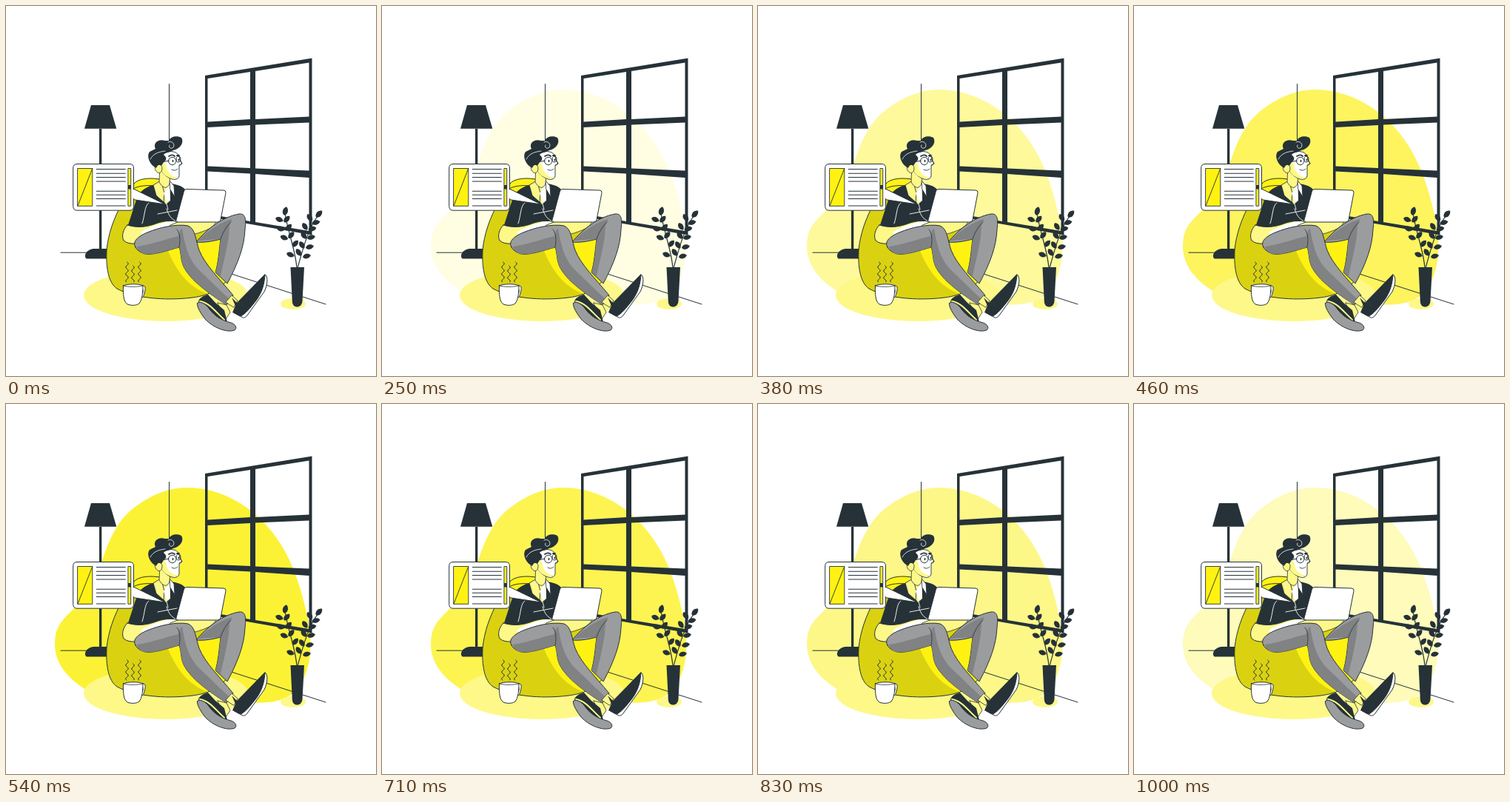
An HTML page with a canvas that plays this animation: 500 by 500 pixels, repeating every 1040 ms.

```html
<!DOCTYPE html>
<html lang="en">
<head>
<meta charset="utf-8">
<title>Reading at home</title>
<style>
html, body { margin: 0; width: 100%; height: 100%; overflow: hidden; background: #fff; }
canvas { display: block; width: 500px; height: 500px; }
</style>
</head>
<body>
<canvas id="stage" width="500" height="500"></canvas>
<script>
const ctx = document.getElementById('stage').getContext('2d');
const INK = '#263238', YELLOW = '#fff212', PALE = '#fef888', SHADE = '#dad211', GLOW = '#fcf017';
const GREY = '#9a9c9e', DARK = '#808284', WHITE = '#fff';
const LOOP = 1040;

function draw(d, fill, stroke, width = 1) {
  const path = new Path2D(d);
  if (fill) { ctx.fillStyle = fill; ctx.fill(path, 'evenodd'); }
  if (stroke) { ctx.strokeStyle = stroke; ctx.lineWidth = width; ctx.stroke(path); }
}
const line = (d, color = INK, width = 1) => draw(d, null, color, width);

function oval(x, y, rx, ry, fill) {
  ctx.beginPath();
  ctx.ellipse(x, y, rx, ry, 0, 0, Math.PI * 2);
  ctx.fillStyle = fill;
  ctx.fill();
}

// The glow advances at 24 steps per second, on a 10 ms clock.
const stepStart = k => 10 * Math.round(k * 100 / 24);
const glow = [[2, 0], [4, .03], [6, .12], [9, .43], [11, .69], [13, .87], [15, .94],
              [16, .85], [17, .75], [20, .51], [24, .29], [25, .25]];

function glowAt(t) {
  let k = 25;
  while (stepStart(k) > t) k--;
  if (k < 3) return 0;
  const i = glow.findIndex(g => g[0] >= k);
  const [k0, a0] = glow[i - 1], [k1, a1] = glow[i];
  return a0 + (a1 - a0) * (k - k0) / (k1 - k0);
}

function backdrop(alpha) {
  ctx.globalAlpha = alpha;
  draw('M242 113C285 112 326 134 353 165C387 203 399 250 408 290C414 323 414 365 390 389C374 404 345 406 320 402L130 396C112 390 95 379 84 367C70 352 64 335 66.5 316C69 288 99 276 115 251C128 224 133 192 150 166C164 141 204 114 242 113Z', GLOW);
  ctx.globalAlpha = 1;
  oval(216, 391, 111, 35, PALE);
  oval(388, 402.5, 17, 7.5, PALE);
  line('M220.5 105.5V184M74 333.2H110M306 362.5L432 403');
}

function windowFrame() {
  draw('M269 94L413.5 70.5V309.5L269 284Z' +
    'M272.5 98L330 89V153L272.5 156.5Z M337 88L409.5 76.5V149.5L337 153Z' +
    'M272.5 164L330 161V219L272.5 216.5Z M337 160.5L409.5 157.5V222.5L337 219.5Z' +
    'M272.5 223.5L330 226.5V291L272.5 281Z M337 227L409.5 232V304L337 292Z', INK);
}

function lamp() {
  draw('M115 134H140L149.3 165.7H106Z M126 166H129.3V329H126Z', INK);
  draw('M109 341.5C104 339 108 328 120 328H142V341.5Z', INK);
}

function leaf(x, y, angle, size = 5.6) {
  ctx.save();
  ctx.translate(x, y);
  ctx.rotate(angle * Math.PI / 180);
  ctx.scale(size, size);
  draw('M-1 0C-.7 -.7 .4 -.85 1 0C.4 .85 -.7 .7 -1 0Z', INK);
  ctx.restore();
}

function plant() {
  line('M393 354C391 329 381 306 377 280M394 354C401 329 408 302 421 284', INK, 1.2);
  leaf(377.5, 277, -75, 6);
  leaf(423, 281, -48, 6);
  [[369.5, 288.5], [371, 301], [376, 313], [384.5, 336]].forEach(([x, y]) => leaf(x, y, 22));
  [[379.5, 288], [382, 299], [385.5, 309.5], [391, 321]].forEach(([x, y]) => leaf(x, y, -48));
  [[410.5, 286], [404, 298], [402.5, 310], [400, 323], [395.5, 333]].forEach(([x, y]) => leaf(x, y, 55));
  [[419, 292.5], [414, 301], [412.5, 312.5], [410.5, 325.5], [406.5, 338]].forEach(([x, y]) => leaf(x, y, -12));
  draw('M384.5 353H403L400.5 399C400 404 397 406.5 393.5 406.5C389.5 406.5 387 404 386.8 399Z', INK);
}

function chair() {
  const body = 'M173 240C178 233 196 231 212 235L245 288L297 305L300 367C294 381 276 391 252 394C213 399 172 394 150 382C138 374 135 352 136 330C138 308 146 286 157 266Z';
  draw(body, SHADE);
  draw('M173 240C178 233 196 231 212 235L205 255L174 250Z', YELLOW);
  draw('M217 327C226 346 238 376 272 389C282 385 293 380 299 370L300 310L260 318Z', YELLOW);
  line(body);
  line('M174 246C180 243 190 242 199 243');
}

function torso() {
  draw('M198 242C187 246 180 251 177 259L165 296C171 302 190 303 215 299L233 291C238 276 242 262 242 248C238 243 230 241 223 240Z', INK);
  draw('M199 242L209 234L221 238L222 263L216 268Z', PALE);
  draw('M209 236L199 242L203 256L213 265L214 253Z', PALE, INK, .9);
  draw('M221 236L227 243L228 258L222 248Z', WHITE, INK, .9);
  draw('M213 253L221 240L222 262L217 266Z', WHITE);
  line('M193 266C187 270 188 282 184 294M205 281L231 276M217 267L219 275M217 274C220 284 224 288 230 291', WHITE, .9);
  // forearm and hands
  draw('M164 296C158 302 156 311 159 317C167 324 181 321 193 316L229 302L234 293C225 288 210 291 200 295C188 299 177 300 164 296Z', PALE, INK);
  draw('M182 306C192 299 214 291 227 291L233 294L217 301C204 305 195 309 185 310Z', WHITE);
  draw('M222 296L235 291H284C281 300 269 304 256 308L226 305Z', PALE, INK, .8);
}

function head() {
  draw('M208 213L207 238C212 247 219 248 221 239L222 229Z', PALE, INK, .8);
  draw('M209 202C215 196 228 194 233 201L235 207L238 213L234 216L234 230C232 236 225 235 220 232C212 228 207 219 208 211Z', WHITE, INK, .9);
  draw('M209 210C207 220 212 228 219 231C224 234 229 234 232 232C223 230 217 224 216 213Z', PALE);
  // ear, then hair over it
  draw('M202 215C206 212 211 215 211 219C211 224 208 227 205 225C202 223 200 219 202 215Z', PALE, INK, .8);
  draw('M200 217C193 212 190 202 194 197L202 193C198 185 206 179 215 182L220 182C222 176 232 175 237 178C241 184 236 193 226 195C221 198 215 198 213 201C217 204 218 208 213 211L210 216C207 213 204 216 203 219Z', INK);
  line('M219 184C224 181 229 187 226 191C223 194 219 191 221 188M195 207C199 199 207 197 215 196', WHITE, .8);
  // glasses and features
  line('M211 211L220 209M219.5 209.5a5.2 5.2 0 1 0 10.4 0a5.2 5.2 0 1 0 -10.4 0M230 207a3 4 0 1 0 6 0a3 4 0 1 0 -6 0');
  line('M220 203C223 201 226 201 228 203M231 202L234 202', INK, 1.8);
  line('M224 221C227 223 230 222 232 220M234 207L238 213L234 215', INK, .9);
  oval(225.5, 209.5, .9, 1.7, INK);
  oval(233.2, 208, .8, 1.5, INK);
}

function laptop() {
  draw('M244.5 247.5L294 249Q297.5 249.2 297 252.5L290 289Q289.4 292 286 292H233Q229 292 230 289L240.5 250Q241.2 247.4 244.5 247.5Z', WHITE, INK);
}

function legs() {
  draw('M257 319C271 302 292 285 315 281C323 280 325 287 323 302C322 325 314 347 299 375L283 360C287 347 288 331 290 315C279 318 268 320 257 319Z', GREY, INK);
  draw('M260 317C273 303 292 291 306 288C299 297 303 306 300 317C297 335 293 350 290 365L283 360C288 345 288 330 290 315Z', DARK);
  line('M290 315C293 306 297 299 304 292', INK, .8);
  draw('M175 326C170 318 179 311 191 306C208 299 231 294 246 297C256 301 256 315 261 330C269 350 289 369 307 391L298 404C275 389 249 371 240 352C236 344 237 334 234 326C219 330 200 337 188 335C181 333 177 330 175 326Z', GREY, INK);
  draw('M177 325C194 323 216 315 233 311C235 304 236 301 238 301C242 324 246 342 262 358C278 373 292 387 303 397L298 404C275 389 249 371 240 352C236 344 237 334 234 326C219 330 200 337 188 335C182 334 178 330 177 325Z', DARK);
  line('M234 326C236 317 235 306 231 302', INK, .8);
}

function shoes() {
  draw('M297 400L305 391L313 398L308 407Z', PALE, INK, .8);
  draw('M286 401L298 404L303 414L297 423Z', PALE, INK, .8);
  draw('M305 394L312 401L349 363C354 362 354 375 350 384L326 418C322 424 317 420 306 414L310 405Z', INK);
  draw('M350 363C355 366 353 378 349 386L326 418C323 422 320 422 317 419C323 417 330 408 338 398C346 387 349 377 350 363Z', WHITE, INK);
  draw('M260 401C259 396 267 391 273 390L283 401L295 411L299 427L278 420Z', INK);
  line('M262 399C275 401 283 413 295 424', PALE, 2);
  draw('M258.5 402C260 398 268 401 273 407C281 419 292 425 304 428C310 430 313 435 309 438C299 442 280 435 269 423C263 415 258 407 258.5 402Z', GREY, INK);
}

function mug() {
  draw('M183 378C189 376 189 382 187 388C186 393 184 395 181 395L182 391C185 390 187 382 183 382Z', WHITE, INK);
  draw('M158.5 378C158 390 159 400 164 403C169 405 176 405 180 402C184 397 185 387 185 378C180 375 164 375 158.5 378Z', WHITE, INK);
  line('M158.5 378C165 380 178 380 185 378', INK, .8);
  [[163.5, 346], [171.5, 351], [180.5, 346]].forEach(([x, top]) => {
    ctx.beginPath();
    for (let y = top; y <= 373; y++) ctx.lineTo(x + 1.8 * Math.sin((y - top) * .68), y);
    ctx.strokeStyle = INK;
    ctx.lineWidth = 1;
    ctx.stroke();
  });
}

function tablet() {
  draw('M168 245L215 268L168 261Z', WHITE, INK);
  draw('M96 213.5H167Q172.5 213.5 172.5 219V270.5Q172.5 276.2 167 276.2H96Q90.7 276.2 90.7 270.5V219Q90.7 213.5 96 213.5Z', WHITE, INK);
  draw('M97 219.5H116.8V270.3H97Z', YELLOW, INK, .9);
  line('M97 270L116.8 219.5', INK, .9);
  [220.5, 226.3, 231.5, 237, 250.3, 255.3, 260.5, 270].forEach(y => line(`M122.3 ${y}H161.3`, INK, 1.1));
  draw('M165.3 219.5H168.7V270.3H165.3Z', YELLOW, INK, .9);
  draw('M165 242H169V247.5H165Z', INK);
  // opening towards the reader
  draw('M170 247L174 249V260H170Z', WHITE);
}

function render(now) {
  ctx.clearRect(0, 0, 500, 500);
  ctx.lineJoin = ctx.lineCap = 'round';
  backdrop(glowAt(now % LOOP));
  [windowFrame, lamp, plant, chair, torso, head, laptop, legs, shoes, mug, tablet].forEach(part => part());
}

const start = performance.now();
function tick() {
  render(performance.now() - start);
  requestAnimationFrame(tick);
}
tick();
</script>
</body>
</html>
```
